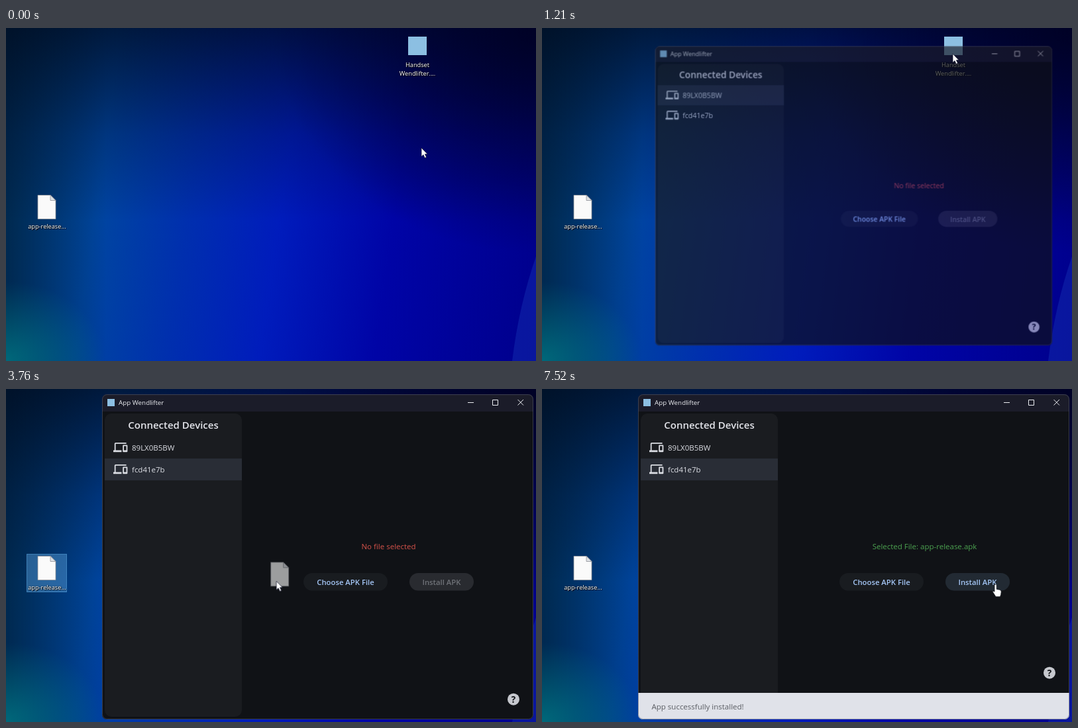
An HTML page that plays this animation: 800 by 503 pixels, repeating every 7550 ms.

```html
<!DOCTYPE html>
<html lang="en">
<head>
<meta charset="utf-8">
<title>Installing an app from the desktop</title>
<style>
html, body { margin: 0; width: 100%; height: 100%; overflow: hidden; background: #001c60; }
svg.stage {
  display: block; width: 800px; height: 503px;
  font-family: "Open Sans", "Noto Sans", sans-serif; font-size: 11.5px;
  background:
    radial-gradient(ellipse 150px 120px at 0 100%, rgba(0,125,135,.75), rgba(0,100,130,0)),
    radial-gradient(ellipse 400px 340px at 100% 0, rgba(0,0,34,.85), rgba(0,0,60,0)),
    linear-gradient(rgba(0,10,30,.75), rgba(0,10,40,.28) 32%, rgba(0,10,40,0) 58%),
    linear-gradient(90deg, rgba(0,22,44,.6), rgba(0,22,44,0) 19%),
    linear-gradient(98deg, #00457c, #0046a0 20%, #002fae 36%, #001cbc 52%, #0004a6 72%, #00008c);
}
.label { font-size: 9.2px; font-weight: 500; fill: #fff; text-anchor: middle; text-shadow: 1px 1px 1px #000, 0 0 2px #000; }
.semi { font-weight: 600; }
.mid { text-anchor: middle; }
.button { font-weight: 600; font-size: 11.3px; fill: #a6c8f8; text-anchor: middle; }

/* Every part shares one clock */
.t { animation: 7.55s infinite step-end; }
.cursor { animation-name: travel; animation-timing-function: ease-in-out; }
.arrow { animation-name: arrow; }
.hand { animation-name: hand; }
.iconHover { animation-name: iconHover; }
.fileHover { animation-name: fileHover; }
.ghost { animation-name: ghost; }
.window { animation-name: open; transform-origin: 470.5px 253px; }
.row { animation-name: row; }
.before { animation-name: before; }
.after { animation-name: after; }
.chooseHover { animation-name: chooseHover; }
.installHover { animation-name: installHover; }
.bar { animation-name: bar; }
.help { animation-name: help; }

@keyframes travel {
  0% { transform: translate(627px, 181px); }
  6.9%, 19.2% { transform: translate(620px, 39px); }
  27.2%, 29.8% { transform: translate(250px, 122px); }
  37.7%, 41% { transform: translate(56px, 281px); }
  55%, 62.9% { transform: translate(549px, 294px); }
  69.5%, 100% { transform: translate(683px, 295px); }
}
@keyframes arrow {
  0%, 30.9%, 64.6% { opacity: 1; }
  25.6%, 55.6%, 65.8%, 100% { opacity: 0; }
}
@keyframes hand {
  0%, 30.9%, 64.6% { opacity: 0; }
  25.6%, 55.6%, 65.8%, 100% { opacity: 1; }
}
@keyframes iconHover { 0%, 15.4%, 100% { opacity: 0; } 4.4% { opacity: 1; } }
@keyframes fileHover { 0%, 55.6%, 100% { opacity: 0; } 36.4% { opacity: 1; } }
@keyframes ghost { 0%, 55.6%, 100% { opacity: 0; } 42% { opacity: .6; } }
@keyframes open {
  0% { opacity: 0; transform: scale(.86); }
  15.36% { opacity: 0; transform: scale(.86); animation-timing-function: linear; }
  16.03% { opacity: .68; transform: scale(.92); animation-timing-function: ease-out; }
  18%, 100% { opacity: 1; transform: none; }
}
@keyframes row { 0% { transform: none; } 27.8%, 100% { transform: translateY(33px); } }
@keyframes before { 0% { opacity: 1; } 55.6%, 100% { opacity: 0; } }
@keyframes after { 0% { opacity: 0; } 55.6%, 100% { opacity: 1; } }
@keyframes chooseHover { 0%, 64.6%, 100% { opacity: 0; } 55.6% { opacity: 1; } }
@keyframes installHover { 0% { opacity: 0; } 65.8%, 100% { opacity: 1; } }
@keyframes bar {
  0% { transform: translateY(41px); }
  74.8% { transform: translateY(41px); animation-timing-function: ease-out; }
  78%, 100% { transform: none; }
}
@keyframes help {
  0% { transform: translateY(40px); }
  74.8% { transform: translateY(40px); animation-timing-function: ease-out; }
  78%, 100% { transform: none; }
}
</style>
</head>
<body>
<svg class="stage" viewBox="0 0 800 503">
  <defs>
    <clipPath id="frame"><rect x="145" y="8" width="651" height="491" rx="7"/></clipPath>
    <path id="devices" fill-rule="evenodd" transform="scale(.89)" d="M4 6h18V4H4c-1.1 0-2 .9-2 2v11H0v3h14v-3H4V6zM23 8h-6c-.55 0-1 .45-1 1v10c0 .55.45 1 1 1h6c.55 0 1-.45 1-1V9c0-.55-.45-1-1-1zm-1 9h-4v-7h4v7z"/>
    <g id="file">
      <path d="M.5 .5h19l8 8v28h-27z" fill="#fafafa" stroke="#8d9096" stroke-width=".8"/>
      <path d="M19.5 .5v8h8z" fill="#dfe2e6" stroke="#8d9096" stroke-width=".8"/>
    </g>
  </defs>

  <!-- Desktop -->
  <path d="M800 345Q774 420 764 503H800z" fill="#2050c8" opacity=".28"/>
  <rect class="t iconHover" x="591.5" y="5.5" width="60" height="70" rx="2" fill="#8c96dc" fill-opacity=".32" stroke="#7882c8" stroke-opacity=".4"/>
  <rect x="607" y="13" width="28" height="28" fill="#8cbfe2"/>
  <text class="label" x="621" y="59">Handset</text>
  <text class="label" x="621" y="71.5">Wendlifter....</text>
  <rect class="t fileHover" x="31.5" y="249.5" width="60" height="57" fill="#5aa0dc" fill-opacity=".45" stroke="#5aa5dc" stroke-opacity=".6"/>
  <use href="#file" x="47.5" y="252"/>
  <text class="label" x="62" y="303">app-release...</text>

  <!-- App window -->
  <g class="t window">
    <g clip-path="url(#frame)">
      <rect x="145" y="8" width="651" height="491" fill="#101216"/>
      <rect x="145" y="8" width="651" height="26" fill="#1b1c29"/>
      <rect x="153" y="15" width="11" height="11" fill="#8cbfe2"/>
      <text x="170" y="24.3" font-size="9.8" fill="#eceef2">App Wendlifter</text>
      <path d="M697 20.5h9M734.5 16.5h8v8h-8zM772.5 16l8.5 8.5M781 16l-8.5 8.5" fill="none" stroke="#eceef2"/>

      <rect x="149" y="37" width="207" height="458" rx="10" fill="#1a1c20"/>
      <rect class="t row" x="149" y="72" width="207" height="33" fill="#292d36"/>
      <text class="semi mid" x="252.5" y="60" font-size="15" fill="#e3e4ea">Connected Devices</text>
      <g fill="#dcdee4" font-weight="500">
        <use href="#devices" x="0" y="0" transform="translate(162 77.4)"/>
        <text x="190" y="93">89LX0B5BW</text>
        <use href="#devices" transform="translate(162 110.4)"/>
        <text x="190" y="126">fcd41e7b</text>
      </g>

      <text class="t before mid" x="577.5" y="241.5" fill="#d4524a">No file selected</text>
      <text class="t after mid" x="577.5" y="241.5" fill="#4ca250">Selected File: app-release.apk</text>

      <rect x="449" y="278" width="127" height="26.5" rx="13.2" fill="#191c20"/>
      <rect class="t chooseHover" x="449" y="278" width="127" height="26.5" rx="13.2" fill="#212830"/>
      <text class="button" x="512.5" y="296">Choose APK File</text>

      <g class="t before">
        <rect x="609" y="278" width="97" height="26.5" rx="13.2" fill="#292b30"/>
        <text class="button" x="657.5" y="296" style="fill:#707379">Install APK</text>
      </g>
      <g class="t after">
        <rect x="609" y="278" width="97" height="26.5" rx="13.2" fill="#191c20"/>
        <rect class="t installHover" x="609" y="278" width="97" height="26.5" rx="13.2" fill="#222a33"/>
        <text class="button" x="657.5" y="296">Install APK</text>
      </g>

      <g class="t help">
        <circle cx="766" cy="428.7" r="9" fill="#c6c8ce"/>
        <text class="mid" x="766" y="433.6" font-size="13.5" font-weight="700" fill="#101216">?</text>
      </g>
      <g class="t bar">
        <rect x="145" y="459" width="651" height="40" fill="#e0e2e9"/>
        <text x="165.5" y="484" fill="#5a5d63">App successfully installed!</text>
      </g>
    </g>
    <rect x="145.5" y="8.5" width="650" height="490" rx="7" fill="none" stroke="#5a5d70" stroke-opacity=".55"/>
  </g>

  <!-- Pointer -->
  <g class="t cursor">
    <g class="t ghost"><use href="#file" x="-9" y="-29"/></g>
    <path class="t arrow" d="M0 0V13.2L3 10.5 5.2 15.3 7.6 14.2 5.4 9.6H9.2z" fill="#fff" stroke="#10142a" stroke-width=".7"/>
    <path class="t hand" transform="translate(-3 0)" d="M3 1.6a1.6 1.6 0 0 1 3.2 0V7.4l4.4.8q2.7.6 2.6 3.2l-.5 4-1.2 3.4H5L1.3 12.9Q-.3 10.7 1 10.2q1-.3 2 1z" fill="#fff" stroke="#14161c" stroke-width=".8"/>
  </g>
</svg>
</body>
</html>
```
